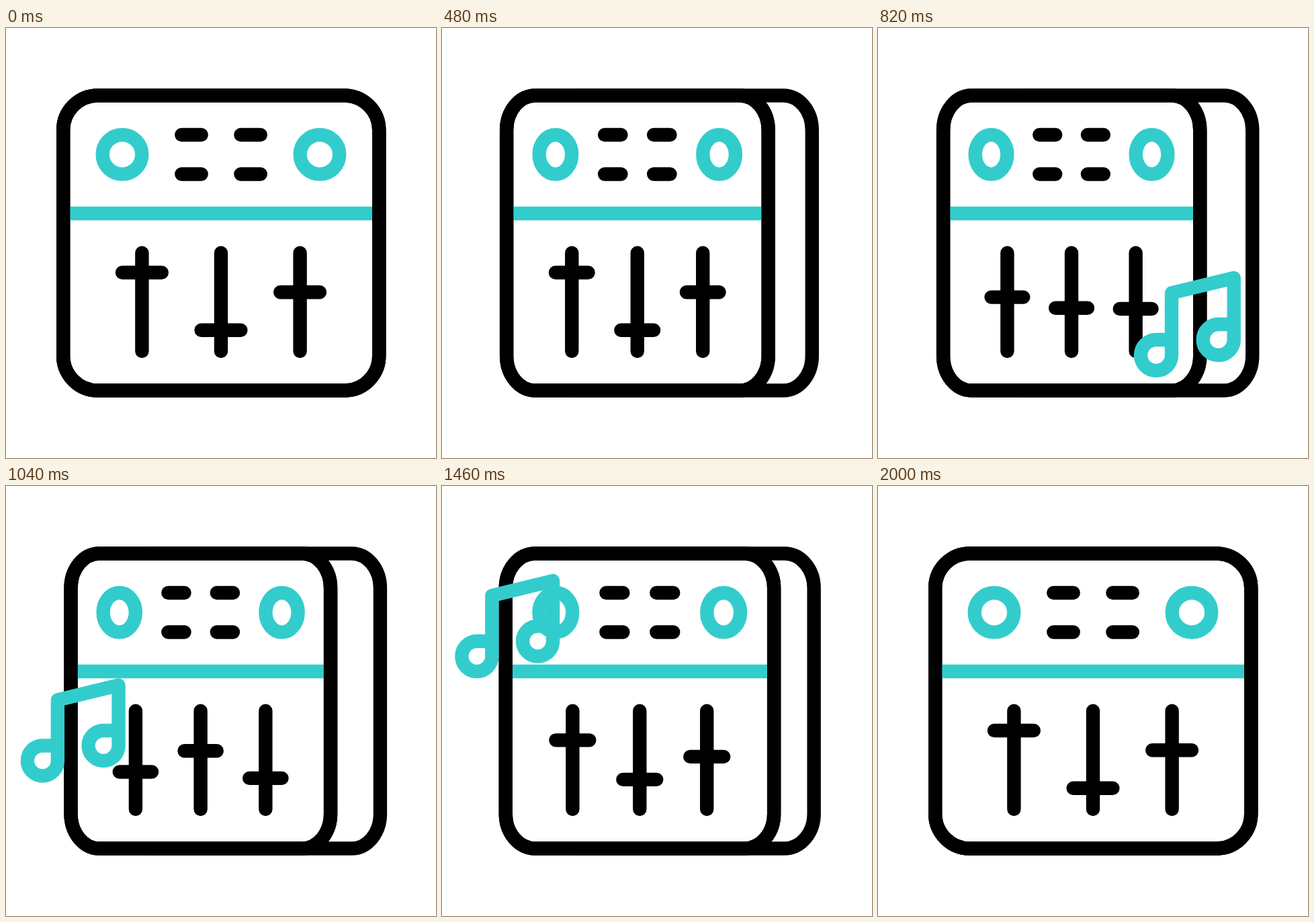
An HTML page for the animation above (2400 ms loop, 640 by 640 pixels).

```html
<!DOCTYPE html>
<html lang="en">
<head>
<meta charset="utf-8">
<title>Mixer</title>
<style>
  html, body { margin: 0; height: 100%; overflow: hidden; background: #fff; }
  svg { display: block; width: 640px; height: 640px; }
  path, rect, circle {
    fill: none; stroke: #000; stroke-width: 20.4;
    stroke-linecap: round; stroke-linejoin: round;
    vector-effect: non-scaling-stroke;
  }
  .teal { stroke: #3cc; }
  .body { fill: #fff; }
</style>
</head>
<body>
<svg viewBox="0 0 640 640">
  <defs>
    <rect id="case" x="85.2" y="100.5" width="470" height="439" rx="51.5"/>
    <path id="note" class="teal" d="M46-46h-23a23 23 0 1 0 23 23V-115.5L138.7-138V-46a23 23 0 1 1-23-23h23"/>
  </defs>
  <g id="back"><use href="#case"/></g>
  <g id="front">
    <rect class="body" x="85.2" y="100.5" width="470" height="439" rx="51.5"/>
    <path class="teal" d="M86 276H554"/>
    <use href="#case"/>
    <circle class="teal" cx="173" cy="188.3" r="29.3"/>
    <circle class="teal" cx="467" cy="188.3" r="29.3"/>
    <path d="M261.3 159h29.4M349.4 159h29.4M261.3 217.5h29.4M349.4 217.5h29.4"/>
    <path d="M202.4 334.7V481M320 334.7V481M437.6 334.7V481"/>
    <path id="knobs"/>
  </g>
  <use id="rightNote" href="#note"/>
  <use id="leftNote" href="#note"/>
</svg>
<script>
const LOOP = 2400, PIVOT = 149;
const el = id => document.getElementById(id);

// Smooth monotone curve through [time, value] keys, flat at both ends and at turns.
function curve(keys) {
  const slope = i => (keys[i + 1][1] - keys[i][1]) / (keys[i + 1][0] - keys[i][0]);
  const tangent = keys.map((_, i) => {
    if (!i || i === keys.length - 1) return 0;
    const a = slope(i - 1), b = slope(i);
    return a * b > 0 ? 2 * a * b / (a + b) : 0;
  });
  return t => {
    if (t <= keys[0][0]) return keys[0][1];
    const i = keys.findIndex(k => k[0] > t) - 1;
    if (i < 0) return keys[keys.length - 1][1];
    const [t0, v0] = keys[i], [t1, v1] = keys[i + 1];
    const h = t1 - t0, p = (t - t0) / h, q = 1 - p;
    return v0 * q * q * (1 + 2 * p) + v1 * p * p * (3 - 2 * p)
      + h * p * q * (tangent[i] * q - tangent[i + 1] * p);
  };
}

const squeeze = curve([[0, 1], [160, .963], [480, .829], [820, .813], [1240, .837], [1660, .867], [2000, 1]]);
const depth = curve([[160, 0], [480, 65], [820, 78], [1240, 67], [1660, 49], [1930, 0]]);

// x, resting y and travel of each slider knob
const knobs = [[202.4, 364, 62], [320, 449.8, -56], [437.6, 393.2, 42]];

function place(id, visible, x, y, scale) {
  el(id).style.display = visible ? '' : 'none';
  el(id).setAttribute('transform', `translate(${x} ${y}) scale(${scale})`);
}

function draw(t) {
  const s = squeeze(t), x = PIVOT * (1 - s);
  el('front').setAttribute('transform', `matrix(${s} 0 0 1 ${x} 0)`);
  el('back').setAttribute('transform', `matrix(${s} 0 0 1 ${x + depth(t)} 0)`);

  const phase = Math.min(1, Math.abs(t - 1073) / 570);
  const slide = (1 + Math.cos(Math.PI * phase)) / 2;
  el('knobs').setAttribute('d',
    knobs.map(([kx, ky, d]) => `M${kx - 29.4} ${ky + d * slide}h58.8`).join(''));

  place('rightNote', t >= 600 && t < 1020, 391, 510.3 - .35 * (t - 820), 1);
  place('leftNote', t >= 1020 && t < 1640, 30.7 - .006 * (t - 1240), 357.8 - .37 * (t - 1240), .978);
}

const start = performance.now();
function tick() {
  draw((performance.now() - start) % LOOP);
  requestAnimationFrame(tick);
}
tick();
</script>
</body>
</html>
```
